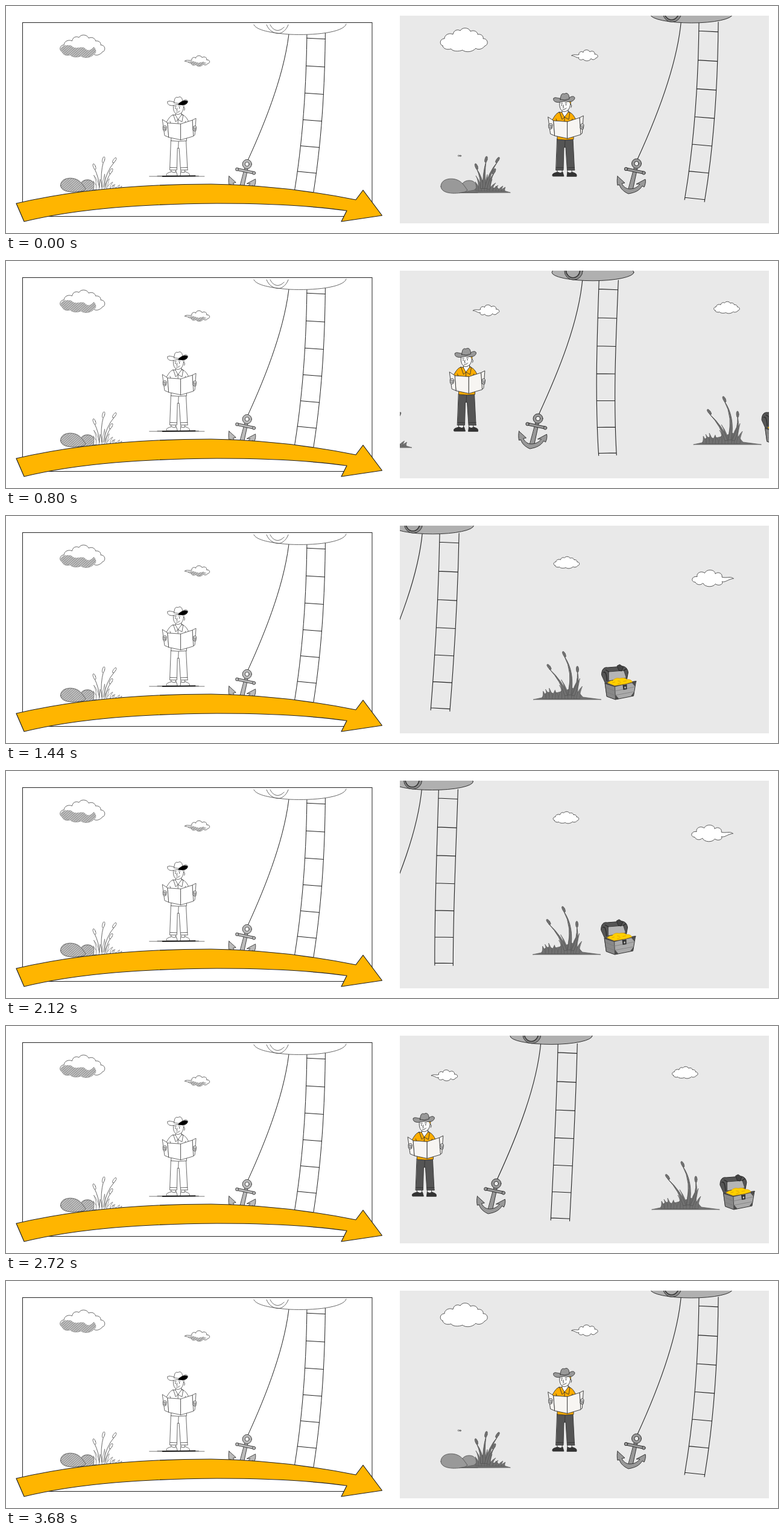
An HTML page for the animation above (3.72 s loop, 1280x376 px).

```html
<!DOCTYPE html>
<html lang="en">
<head>
<meta charset="utf-8">
<title>From sketch to camera move</title>
<style>
html, body { margin: 0; width: 100%; height: 100%; overflow: hidden; background: #fff; }
svg { display: block; width: 1280px; height: 376px; }
path, circle, ellipse, polygon { vector-effect: non-scaling-stroke; stroke-linejoin: round; stroke-linecap: round; }
</style>
</head>
<body>
<svg id="stage" viewBox="0 0 1280 376" fill="none"></svg>
<script>
const LOOP = 3720, STEP = 40, PAN = 430, MOVE = 1280;

const color = {
  line: '#333', lw: 0.9, hat: '#999', face: '#fff', hair: '#f5ab00', shirt: '#ffad00',
  pants: '#555', shoe: '#333', map: '#f7f5f2', hand: '#ddd', rock: '#999', plant: '#717171',
  plantLine: '#5a5a5a', anchor: '#999', hole: '#eee', cloud: '#fff'
};
const sketch = {
  line: '#444', lw: 0.8, hat: '#fff', face: '#fff', hair: '#fff', shirt: '#fff',
  pants: '#fff', shoe: '#fff', map: '#fff', hand: '#ddd', rock: 'url(#hatch)', plant: '#fff',
  plantLine: '#555', anchor: '#bbb', hole: '#fff', cloud: '#fff', rough: true
};

const path = (d, fill = 'none', stroke = 'none', w = 1) =>
  `<path d="${d}" fill="${fill}" stroke="${stroke}" stroke-width="${w}"/>`;
const oval = (x, y, rx, ry, fill, stroke = 'none', w = 1, turn = 0) =>
  `<ellipse cx="${x}" cy="${y}" rx="${rx}" ry="${ry}" fill="${fill}" stroke="${stroke}" stroke-width="${w}" transform="rotate(${turn} ${x} ${y})"/>`;
const group = (transform, body) => `<g transform="${transform}">${body}</g>`;

const BIG_CLOUD = 'M724 66C718 64 719 54 727 54C727 47 736 44 741 47C743 38 751 39 753 41C757 34 768 36 770 42C776 39 782 43 782 47C789 46 792 51 791 54C800 54 800 65 794 66C790 72 782 73 779 70C773 77 761 77 757 73C750 76 740 75 738 71C731 73 725 71 724 66Z';
const SMALL_CLOUD = 'M938 82C941 79 945 82 950 80.5C949 76 955 74 957 77C957 72 966 71 968 76C972 73 977 76 976 80C982 79 983 86 978 86C977 89 972 90 970 87C968 92 959 92 957 88C953 91 948 88 950 85.5C946 86.5 944 83 938 82Z';

const bigCloud = p => path(BIG_CLOUD, p.cloud, p.line, 0.8) + (p.rough ?
  path('M722 65C718 57 728 52 740 55C746 63 756 55 763 59C768 66 776 62 779 57C784 62 785 68 779 70C773 77 761 77 757 73C750 76 740 75 738 71C731 73 725 71 722 65Z', 'url(#hatch)') : '');
const smallCloud = p => path(SMALL_CLOUD, p.cloud, p.line, 0.8) + (p.rough ?
  path('M941 83L952 82L962 85L970 83L977 86L970 87C968 91 960 91 957 88C953 90 950 88 950 85Z', 'url(#hatch)') : '');

// A stalk is [foot x, foot y, bend x, bend y, tip x, tip y]
function stalk([x, y, bx, by, tx, ty], p) {
  const turn = Math.atan2(ty - by, tx - bx) * 180 / Math.PI + 90;
  const head = oval(tx, ty + 3, 2, 5.2, p.plant, p.plantLine, 0.8, turn);
  const bend = `Q${bx} ${by} ${tx} ${ty + 6}`;
  return p.rough ? path(`M${x} ${y}${bend}`, 'none', p.plantLine, 0.9) + head
    : path(`M${x - 2.5} ${y}${bend}Q${bx + 3} ${by} ${x + 2.5} ${y}Z`, p.plant, p.plantLine, 1) + head;
}
// A blade is [foot x, height, lean]
const blades = (list, y, p) => list.map(([x, h, lean]) =>
  path(`M${x - 3} ${y}Q${x - 1.5} ${y - h * 0.6} ${x + lean} ${y - h}Q${x + 2.5} ${y - h * 0.5} ${x + 3} ${y}Z`, p.plant, p.plantLine, 0.6)).join('');

function rocks(p) {
  const ground = p.rough ? '' :
    path('M752 309.5L776 305Q786 294 798 299L816 303L836 309Z', p.plant, p.plantLine, 0.7);
  return path('M753 309C752 297 758 289 768 289C778 289 781 296 782 309Z', p.rock, '#555', 0.9) +
    path('M721 299C721 286 738 284 748 288C756 291 760 298 765 305C763 307 760 309 757 309C745 311 722 312 721 299Z', p.rock, '#555', 0.9) +
    ground +
    blades([[782, 15, -4], [786, 25, -7], [791, 18, -1], [796, 27, 2], [800, 19, 6], [804, 13, 8],
      [810, 9, 6], [815, 8, -3], [819, 8, 5], [824, 6, 4]], 306, p) +
    stalk([789, 302, 788, 285, 780, 263], p) + stalk([793, 302, 790, 278, 796, 251], p) +
    stalk([796, 302, 800, 275, 815, 252], p) + stalk([800, 303, 800, 288, 809, 271], p);
}

const reeds = p => path('M875 304L889 301Q897 287 908 294L925 290L940 285L950 292L957 300L987 304Z', p.plant, p.plantLine, 0.7) +
  blades([[893, 12, -2], [899, 15, -4], [904, 17, -3], [909, 14, 2], [914, 12, -3], [919, 15, 4], [925, 22, -7],
    [930, 31, -9], [935, 32, 1], [941, 26, 5], [945, 33, 7], [949, 20, 7]], 302, p) +
  stalk([929, 297, 921, 274, 901, 247], p) + stalk([935, 296, 941, 258, 926, 226], p) +
  stalk([941, 297, 949, 278, 948, 251], p);

const chest = () =>
  path('M988 263C988 254 992 250 998 251L1024 249Q1031 251 1032 259L1030 270L995 278Z', '#555', '#2b2b2b', 1) +
  path('M1000 258L1025 256L1029 268L1000 273Z', '#b5b5b5', '#333', 0.8) +
  path('M991 259Q996 256 997 273M995 255L1000 258M1025 256L1029 253', 'none', '#2b2b2b', 1.4) +
  path('M1014 248L1018 246L1024 250L1021 257L1017 256Z', '#444', '#222', 0.8) +
  path('M994 277L1045 274L1041 298L1011 304L997 299Z', '#aaa', '#333', 1) +
  path('M994 277L1010 282L1011 304L997 299Z', '#888', '#333', 0.8) +
  path('M994 277L1010 282L1045 274', 'none', '#444', 2) +
  path('M1010 290L1043 283M1010 297L1042 291M996 284L1010 290M997 292L1010 297', 'none', '#777', 0.7) +
  path('M1011 296L1017 303L1011 304ZM1041 298L1036 299L1042 291ZM1045 274L1043 282L1038 276Z', '#4d4d4d') +
  path('M998 276Q1004 272 1006 273Q1011 267 1018 269Q1027 267 1030 271Q1037 270 1039 275L1028 278L1010 281Z', '#ffd000', '#d89b00', 0.7) +
  path('M1006 276L1010 275M1015 273L1019 274M1024 274L1029 273M1015 278L1020 276', 'none', '#e0a000', 0.9) +
  path('M1023 280L1030 279L1030 287L1024 288Z', '#333') + oval(1027, 284, 1.2, 1.7, '#ccc');

const anchor = p =>
  path('M1042 267L1047 268L1039 305L1032 304Z', p.anchor, p.line, 1) +
  path('M1014 282L1026 293L1021 294C1024 300 1029 303 1034 303C1043 303 1048 299 1051 295L1045 295L1060 287C1061 291 1060 296 1058 300L1055 298C1050 306 1043 309 1032 311C1025 308 1019 303 1017 296L1014 297C1013 292 1013 287 1014 282Z', p.anchor, p.line, 1) +
  path('M1029 268L1057 274L1056 278L1028 272Z', p.anchor, p.line, 1) +
  oval(1028, 270, 2.7, 2.7, p.anchor, p.line) + oval(1057.5, 276.5, 2.7, 2.7, p.anchor, p.line) +
  oval(1045.5, 261, 8, 8, p.anchor, p.line) + oval(1045.5, 261, 3.6, 3.6, p.hole, p.line);

function man(p) {
  const draw = (d, fill = 'none') => path(d, fill, p.line, p.lw);
  const shade = p.rough ? path('M926 158C930 152 938 149 943 152C943 158 935 160 926 158Z', '#000') +
    path('M876 283H972M890 282.3H962', 'none', '#555', 0.8) + path('M899 283L956 282.2', 'none', '#111', 1.6) : '';
  return draw('M914 271L914 277H922V271ZM931 271V277H938V271Z', p.face) +
    draw('M906 281C905 277 911 276 915 275Q919 278 923 275L925 282L907 282ZM930 282L931 275Q935 278 939 275C943 277 947 277 946 282Z', p.shoe) +
    draw('M914 220L940 220L942.5 270L943 272L930.5 272L928 234L925 234L924 272L912 272Z', p.pants) +
    draw('M912.5 267.5L924 268M930.5 268L942.5 267.5M927 222L926.5 234') +
    draw('M917 176L934 176C940 178 943 184 947 193L941 200L941 221Q928 223 914 221L914 200L903 193C909 184 911 178 917 176Z', p.shirt) +
    draw('M922 171L922 177L926 184L932 176L932 170Z', p.face) +
    draw('M918 158C917 167 919 174 926 175C933 174 936 168 936 158Z', p.face) +
    draw('M918 176L922 188L926 184L933 188L935 176L932 174M926 184V192M912 187L914 193M939 187L937 193') +
    path('M934 158L935 161L936.5 163L936.5 158Z', p.hair, p.line, 0.5) +
    draw('M936 163Q939 163 937 168') +
    oval(921.5, 164, 0.8, 1, '#222') + oval(928.5, 163.5, 0.8, 1, '#222') +
    draw('M924.5 164L923.5 168L925 168M923 171Q927 172 929 169M920 161L923 161M927 160.5L930 160.5') +
    draw('M908 153C910 150 914 153 920 153L934 152C938 149 942 149 943 152C943 157 936 160 930 158C922 157 917 161 912 159C908 158 907 155 908 153Z', p.hat) +
    draw('M919 155C920 147 921 144 926 145.5C930 143 934 145 934 154Q926 157 919 155Z', p.hat) +
    draw('M899 184L908 190L910 215L903 212ZM957 182L951 185L952 213L955 211Z', p.map) +
    draw('M908 190L931 191.5L931 219.5L910 215Z', p.map) +
    draw('M931 191.5L951 185L953 213L931 219.5Z', p.map) +
    draw('M900 196Q905 193 906 197L905 203Q901 205 900 202ZM953 196Q958 193 958 198L957 204Q953 205 952 202Z', p.hand) +
    draw('M901 198L905 198.5M901 201L905 201M953 199L957 199M953 202L957 201.5') + shade;
}

const rope = drop => `M1119.5 ${24 + drop}C1113 ${96 + drop} 1081 180 1046 256`;

// w is the sway, from 0 (high, leaning left) to 1 (low, leaning right)
function ladder(w) {
  const y0 = 25 + 7 * w, y1 = 321 + 1.5 * w;
  const xs = [1149 - 3 * w, 1148 - 6 * w, 1142 - 3 * w, 1125 + 28 * w];
  const left = xs.map((x, i) => [x, y0 + (y1 - y0) * i / 3]);
  const across = (q, s) => [q[0] + 32 + s * (1 - 4.5 * w), q[1] + 1.5 * (1 - s) + s * (3.5 - 5.5 * w)];
  const right = left.map((q, i) => across(q, i / 3));
  const rail = q => `M${q[0]}C${q[1]} ${q[2]} ${q[3]}`;
  const at = s => [0, 1].map(k => {
    const r = 1 - s;
    return r * r * r * left[0][k] + 3 * r * r * s * left[1][k] + 3 * r * s * s * left[2][k] + s * s * s * left[3][k];
  });
  let d = rail(left) + rail(right);
  for (let i = 0; i < 7; i++) {
    const s = 0.055 + 0.165 * i - 0.0016 * i * i, q = at(s);
    d += `M${q}L${across(q, s)}`;
  }
  return d;
}

const airship = () => oval(1136.5, 14, 68, 14, '#b0b0b0', '#333', 1) +
  oval(1104.5, 12, 15, 14.5, '#8c8c8c', '#333', 1) + oval(1103.5, 10.5, 11.5, 12.5, '#aaa', '#333', 1.5);

const stage = document.getElementById('stage');
stage.innerHTML = `<defs>
  <pattern id="hatch" width="3" height="3" patternUnits="userSpaceOnUse" patternTransform="rotate(-42)">
    <rect width="3" height="3" fill="#ccc"/><rect width="3" height="1.3" fill="#8c8c8c"/>
  </pattern>
  <clipPath id="view"><rect x="653" y="16" width="612" height="344"/></clipPath>
  </defs>
  <rect width="1280" height="376" fill="#fff"/>
  <rect x="27.5" y="27.5" width="579.5" height="321" stroke="#222"/>` +
  group('translate(-594.5 13.3) scale(.95)', bigCloud(sketch) + smallCloud(sketch) + rocks(sketch) + man(sketch)) +
  group('translate(-593.5 14) scale(.95)', path(rope(0), 'none', '#222', 1) + anchor(sketch)) +
  group('translate(-592.5 14) scale(.95)', path(ladder(0), 'none', '#222', 1)) +
  path('M411 31C414 38 430 44 470 47C510 49 560 44 564 30', '#fff') +
  path('M411 31C414 38 430 44 470 47C510 49 560 44 564 30M432 31C436 42 447 47 455 45C461 43 466 37 468 31M438 31C442 40 452 45 461 35', 'none', '#555', 0.9) +
  path('M17 327C120 303 230 295 340 295C425 296 505 306 580 321L592 305L623.5 347L556 357L565 339C500 330 430 327 350 327C235 328 125 334 30 357Z', '#ffb500', '#222', 1.2) +
  `<g clip-path="url(#view)"><rect x="653" y="16" width="612" height="344" fill="#e9e9e9"/><g id="world">` +
  bigCloud(color) + smallCloud(color) +
  group('translate(1337 67) scale(.545 .5) translate(-720 -36)', bigCloud(color)) +
  group('translate(1635 90) scale(-1.58 1.5) translate(-938 -73)', smallCloud(color)) +
  rocks(color) + group('translate(428.5 0)', reeds(color) + chest()) +
  `<path id="rope" stroke="#222" stroke-width="1.1"/><path id="ladder" stroke="#222" stroke-width="1.1"/>
  <g id="airship">${airship()}</g>` + anchor(color) + man(color) +
  `<g id="bee">${oval(-1.4, 0, 1.3, 1.1, '#ddd', '#555', 0.7) + oval(1.4, 0.2, 1.3, 1.1, '#999', '#555', 0.7)}</g></g></g>`;

const [world, ropeLine, ladderLine, ship, bee] =
  ['world', 'rope', 'ladder', 'airship', 'bee'].map(id => document.getElementById(id));

// Symmetric bezier ease (.6, 0, .4, 1)
function ease(x) {
  if (x <= 0) return 0;
  if (x >= 1) return 1;
  let lo = 0, hi = 1;
  for (let i = 0; i < 24; i++) {
    const m = (lo + hi) / 2, n = 1 - m;
    if (1.8 * n * n * m + 1.2 * n * m * m + m * m * m < x) lo = m; else hi = m;
  }
  return lo * lo * (3 - 2 * lo);
}

function render(ms) {
  const t = Math.floor(ms % LOOP / STEP) * STEP, turn = 2 * Math.PI * t / LOOP;
  const pan = PAN * (ease((t - 223) / MOVE) - ease((t - 2101) / MOVE));
  const w = 0.5 - 0.5 * Math.cos(3 * turn + 0.126);
  const drop = 6.3 * w;
  world.setAttribute('transform', `translate(${-pan} 0)`);
  ship.setAttribute('transform', `translate(0 ${drop})`);
  ropeLine.setAttribute('d', rope(drop));
  ladderLine.setAttribute('d', ladder(w));
  const bx = 743 + 9 * Math.cos(3 * turn), by = 241.5 + 6.5 * Math.cos(3 * turn) + 2 * Math.sin(2 * turn);
  bee.setAttribute('transform', `translate(${bx} ${by})`);
}

const start = performance.now();
function tick() {
  render(performance.now() - start);
  requestAnimationFrame(tick);
}
tick();
</script>
</body>
</html>
```
